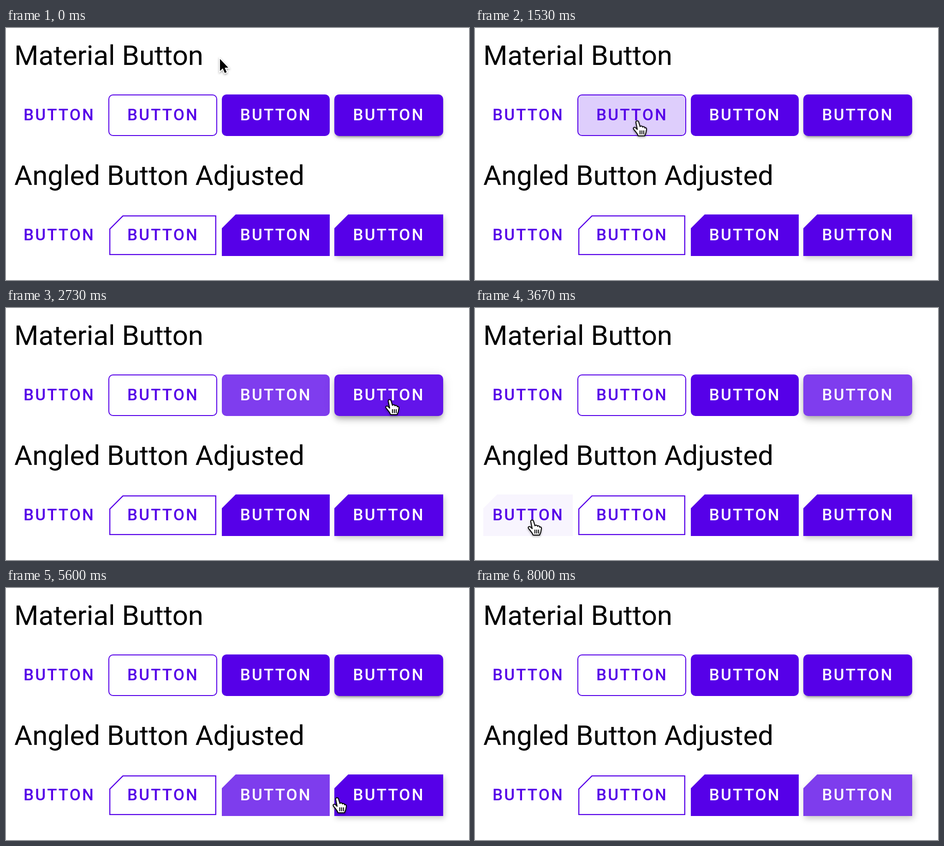
Animation of 1004 by 546 pixels, one loop 8.07 s. Source, as an HTML page:

```html
<!DOCTYPE html>
<html lang="en">
<head>
<meta charset="utf-8">
<title>Button states</title>
<style>
  html, body { margin: 0; width: 100%; height: 100%; overflow: hidden; background: #fff; }
  #stage {
    position: relative; width: 1004px; height: 546px; overflow: hidden;
    font-family: Roboto, sans-serif; --main: #5600e8;
  }
  h1 {
    position: absolute; left: 18px; margin: 0; color: #000; white-space: nowrap;
    font-size: 60px; font-weight: 400; line-height: 71px;
  }
  .btn { position: absolute; height: 90px; border-radius: 10px; color: var(--main); }
  .face { position: absolute; inset: 0; box-sizing: border-box; overflow: hidden; border-radius: 10px; }
  .filled { color: #fff; }
  .filled .face { background: var(--main); }
  .outlined .face { border: 2px solid; }
  .angled .face {
    border-radius: 0; --cut: 30px;
    clip-path: polygon(var(--cut) 0, 100% 0, 100% 100%, 0 100%, 0 var(--cut));
  }
  .angled.outlined .face { inset: 2px; border: 0; --cut: 29px; }
  .state { position: absolute; inset: 0; background: currentColor; opacity: 0; }
  .ripple { position: absolute; left: 0; top: 0; border-radius: 50%; background: currentColor; opacity: 0; }
  .face svg { position: absolute; left: 0; top: 0; fill: none; stroke: currentColor; stroke-width: 4.6; }
  .label {
    position: absolute; top: 0; white-space: nowrap;
    font-size: 35px; font-weight: 500; line-height: 90px; letter-spacing: 3.125px;
  }
  #cursor { position: absolute; left: 0; top: 0; width: 1px; height: 1px; overflow: visible;
    filter: drop-shadow(0 2px 2px rgba(0, 0, 0, .35)); }
</style>
</head>
<body>
<div id="stage">
  <h1 style="top:24px">Material Button</h1>
  <h1 style="top:284px">Angled Button Adjusted</h1>
  <svg id="cursor">
    <path id="arrow" d="M1 1V27L7 21.500L11.500 31.500L15.500 29.800L11.300 20H19Z"
      fill="#000" stroke="#fff" stroke-width="4" paint-order="stroke"/>
    <g id="hand" stroke="#000" stroke-width="2" stroke-linejoin="round" stroke-linecap="round">
      <path fill="#fff" d="M-1 2C-2 -2 4 -3 5 1L8 11C9 9 13 9 13.500 12C15 10 18 11 18.500 14C20 12.500 22.500 14 22 17L20.500 25L18 31H4C2 25 -3 21 -6 16.500C-8 13 -4 11 -1 14L2 17Z"/>
      <path d="M8 20V27M12 20V27M16 20V27"/>
    </g>
  </svg>
</div>
<script>
const LOOP = 8070;
const STANDARD = 'cubic-bezier(.4, 0, .2, 1)';
const stage = document.getElementById('stage');
const cursor = document.getElementById('cursor');

// Loops one property through [ms, value, easing] points, held at both ends.
function track(el, prop, points) {
  const frames = points.map(([ms, value, easing = 'linear']) => ({ offset: ms / LOOP, [prop]: value, easing }));
  if (frames[0].offset > 0) frames.unshift({ ...frames[0], offset: 0, easing: 'linear' });
  if (frames.at(-1).offset < 1) frames.push({ ...frames.at(-1), offset: 1 });
  el.animate(frames, { duration: LOOP, iterations: Infinity });
}

// Turns [start, value] changes into eased transitions of a fixed length.
function transitions(initial, changes, length) {
  let last = initial;
  return changes.filter(([ms]) => ms < LOOP).flatMap(([ms, value]) => {
    const step = [[ms, last, STANDARD], [ms + length, value]];
    last = value;
    return step;
  });
}

function add(parent, className) {
  const el = document.createElement('div');
  el.className = className;
  parent.append(el);
  return el;
}

const boxShadow = (...layers) => layers.map(([y, blur, spread, alpha]) =>
  `0 ${y * 2.5}px ${blur * 2.5}px ${spread * 2.5}px rgba(0, 0, 0, ${alpha})`).join(', ');
const dropShadow = (x, y, blur, alpha) => `drop-shadow(${x}px ${y}px ${blur}px rgba(0, 0, 0, ${alpha}))`;

const ELEVATION = {
  boxShadow: {
    rest: boxShadow([3, 1, -2, .2], [2, 2, 0, .14], [1, 5, 0, .12]),
    raised: boxShadow([2, 4, -1, .2], [4, 5, 0, .14], [1, 10, 0, .12]),
    pressed: boxShadow([5, 5, -3, .2], [8, 10, 1, .14], [3, 14, 2, .12])
  },
  filter: {
    rest: dropShadow(3, 5, 6, .2),
    raised: dropShadow(3, 5, 7, .23),
    pressed: dropShadow(4, 8, 9, .28)
  }
};

const KINDS = [
  { left: 18, width: 194, pad: 20, style: '' },
  { left: 222, width: 236, pad: 41, style: 'outlined' },
  { left: 468, width: 234, pad: 39.8, style: 'filled' },
  { left: 712, width: 236, pad: 40.6, style: 'filled', elevated: true }
];

// Per button: pointer enters, press, release, pointer leaves, focus lost, press point.
const EVENTS = [
  [330, 560, 700, 960, 1330, 130, 205],
  [970, 1330, 1480, 1600, 1820, 335, 203],
  [1640, 1820, 2090, 2440, 2760, 590, 197],
  [2480, 2760, 2930, 3080, 3930, 830, 200],
  [3600, 3930, 4090, 4230, 4430, 122, 461],
  [4280, 4430, 4690, 4940, 5180, 327, 456],
  [4980, 5180, 5340, 5590, 5980, 570, 458],
  [5615, 5980, 6130, 6500, LOOP, 820, 456]
];

function makeButton([enter, press, release, leave, blur, pressX, pressY], index) {
  const { left, width, pad, style, elevated } = KINDS[index % 4];
  const angled = index > 3;
  const top = angled ? 404 : 144;
  const filled = style === 'filled';
  const button = add(stage, `btn ${style} ${angled ? 'angled' : ''}`);
  Object.assign(button.style, { left: left + 'px', top: top + 'px', width: width + 'px' });

  const face = add(button, 'face');
  const state = add(face, 'state');
  const ripple = add(face, 'ripple');
  if (angled && style === 'outlined') {
    face.insertAdjacentHTML('beforeend',
      '<svg width="232" height="86"><path d="M29 0H232V86H0V29Z"/></svg>');
  }
  const label = add(button, 'label');
  label.textContent = 'BUTTON';
  label.style.left = pad + 'px';

  const hover = filled ? .08 : .04;
  const strong = hover * 3;
  const statePoints = [[enter, 0], [enter + 15, hover], [press, hover], [press + 75, strong], [blur, strong]];
  if (blur < LOOP) statePoints.push([blur + 75, 0]);
  track(state, 'opacity', statePoints);

  const size = Math.hypot(width, 90) + 25;
  ripple.style.width = ripple.style.height = size + 'px';
  const place = (x, y, scale) => `translate(${x - size / 2}px, ${y - size / 2}px) scale(${scale})`;
  track(ripple, 'transform', [
    [press, place(pressX - left, pressY - top, .6 * width / size), STANDARD],
    [press + 225, place(width / 2, 45, 1)]
  ]);
  track(ripple, 'opacity', [[press, 0], [press + 75, strong], [release, strong], [release + 150, 0]]);

  if (elevated) {
    const prop = angled ? 'filter' : 'boxShadow';
    const { rest, raised, pressed } = ELEVATION[prop];
    track(button, prop, transitions(rest,
      [[enter, raised], [press, pressed], [press + 285, raised], [blur, rest]], 280));
  }
}
EVENTS.forEach(makeButton);
stage.append(cursor);

const IN = 'ease-in', OUT = 'ease-out', BOTH = 'ease-in-out';
track(cursor, 'transform', [
  [0, 463, 66], [70, 463, 66, BOTH], [500, 130, 205], [720, 130, 205, IN],
  [930, 209, 207, OUT], [1150, 335, 203], [1480, 335, 203, BOTH],
  [1780, 590, 197], [2110, 590, 197, BOTH], [2560, 830, 200], [2950, 830, 200, IN],
  [3080, 780, 236], [3300, 500, 522, OUT], [3640, 122, 461], [4120, 122, 461, BOTH],
  [4370, 327, 456], [4710, 327, 456, BOTH], [5050, 570, 458], [5400, 570, 458, IN],
  [5600, 715, 456, OUT], [5790, 820, 456], [6200, 820, 456, IN],
  [6510, 952, 466], [6850, 1020, 478]
].map(([ms, x, y, easing]) => [ms, `translate(${x}px, ${y}px)`, easing]));

const handTimes = [[0, 0], [330, 1], [3080, 0], [3600, 1], [6500, 0]];
track(document.getElementById('hand'), 'opacity', handTimes.map(([ms, on]) => [ms, on, 'step-end']));
track(document.getElementById('arrow'), 'opacity', handTimes.map(([ms, on]) => [ms, 1 - on, 'step-end']));
</script>
</body>
</html>
```
